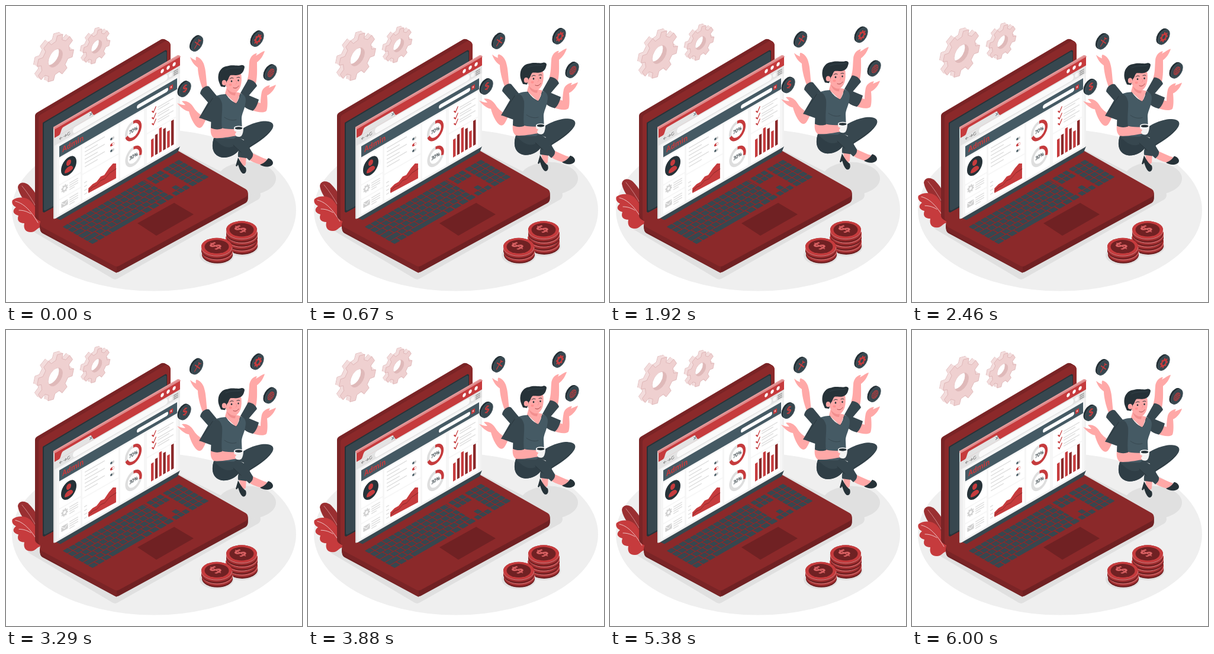
An HTML page with a canvas that plays this animation: 500 px wide and 500 px high, repeating every 6040 ms.

```html
<!DOCTYPE html>
<html lang="en">
<head>
<meta charset="utf-8">
<title>Admin dashboard</title>
<style>
html, body { margin: 0; width: 100%; height: 100%; overflow: hidden; background: #fff; }
canvas { display: block; width: 500px; height: 500px; }
</style>
</head>
<body>
<canvas id="stage"></canvas>
<script>
const cv = document.getElementById('stage');
const c = cv.getContext('2d');
const dpr = window.devicePixelRatio || 1;
cv.width = cv.height = 500 * dpr;

const LOOP = 6040, RISE = 9.4;
const RED = '#c63b3d', WINE = '#8b292a', DEEP = '#702123';
const SLATE = '#37474f', STEEL = '#455a64', INK = '#263238';
const SKIN = '#ffa8a7', BLUSH = '#f28f8f', SHADE = '#e0e0e0';
const FONT = '"Open Sans", "Noto Sans", sans-serif';
const TAU = Math.PI * 2;

function shape(d, fill) { c.fillStyle = fill; c.fill(new Path2D(d)); }
function line(d, color, w = 1) {
  c.strokeStyle = color; c.lineWidth = w; c.lineCap = c.lineJoin = 'round';
  c.stroke(new Path2D(d));
}
function oval(x, y, rx, ry, fill) {
  c.beginPath(); c.ellipse(x, y, rx, ry, 0, 0, TAU);
  c.fillStyle = fill; c.fill();
}
function box(x, y, w, h, fill, r = 0) {
  c.beginPath(); c.roundRect(x, y, w, h, r);
  c.fillStyle = fill; c.fill();
}
function poly(pts, fill, r = 0, dx = 0, dy = 0) {
  const n = pts.length, last = pts[n - 1];
  c.beginPath();
  c.moveTo((last[0] + pts[0][0]) / 2 + dx, (last[1] + pts[0][1]) / 2 + dy);
  pts.forEach((p, i) => {
    const q = pts[(i + 1) % n];
    c.arcTo(p[0] + dx, p[1] + dy, (p[0] + q[0]) / 2 + dx, (p[1] + q[1]) / 2 + dy, r);
  });
  c.closePath(); c.fillStyle = fill; c.fill();
}
function at(m, draw) { c.save(); c.transform(...m); draw(); c.restore(); }
const wall = (x, y) => [.866, -.5, 0, 1, x, y];
const floor = (x, y) => [.866, -.5, .866, .5, x, y];
function label(s, x, y, size, fill, weight = 700, align = 'center') {
  c.font = `${weight} ${size}px ${FONT}`;
  c.textAlign = align; c.textBaseline = 'middle';
  c.fillStyle = fill; c.fillText(s, x, y);
}

function cog(R, hole, teeth = 8) {
  const p = new Path2D(), step = TAU / teeth;
  for (let i = 0; i < teeth; i++) {
    [[-.29, .77], [-.2, 1], [.2, 1], [.29, .77]].forEach(([a, r]) => {
      const t = (i + a + .33) * step;
      p.lineTo(R * r * Math.cos(t), R * r * Math.sin(t));
    });
  }
  p.closePath();
  p.moveTo(hole, 0);
  p.arc(0, 0, hole, 0, TAU);
  return p;
}
function gear(x, y, R, depth) {
  const hole = R * .38, p = cog(R, hole);
  for (let k = depth; k >= 0; k -= .5) at(wall(x - k, y - k * .577), () => {
    c.fillStyle = k ? '#f3dcdc' : '#efd0d0';
    c.fill(p, 'evenodd');
    if (k === 0 || k === depth) {
      c.strokeStyle = '#d5a5a6'; c.lineWidth = .6; c.stroke(p);
    }
  });
  // Inner wall of the hole
  at(wall(x, y), () => {
    c.beginPath(); c.arc(0, 0, hole, 0, TAU); c.clip();
    c.fillStyle = '#dfb9b9'; c.fill();
    oval(-depth / .866, -depth * 1.155, hole, hole, '#fff');
  });
}

function ground() {
  oval(250, 345, 240, 136.5, '#efefef');
  poly([[26, 369], [184, 463], [440, 319], [285, 240]], SHADE, 9);
  oval(407, 291.5, 49, 28, SHADE);
}

function plant() {
  shape('M55 356C42 344 22 322 20 306C21 297 32 296 39 303C48 312 54 322 56 334Z', '#9a2f31');
  line('M27 304C36 315 45 328 52 342', '#dc9b9c', .8);
  shape('M11 328C19 322 33 322 41 329C49 337 54 348 58 360L58 374C52 375 50 382 42 382C33 382 29 376 31 367C22 367 18 362 21 354C13 352 9 346 17 340C11 337 9 332 11 328Z', RED);
  line('M16 330C30 333 42 346 54 366M22 345C31 345 37 348 42 351', '#f1d4d4', .9);
}

function keyboard() {
  at(floor(96, 373), () => {
    const key = (x, y, w) => box(x, y, w, 8.5, SLATE, .8);
    for (let r = 0; r < 6; r++) {
      const y = r * 9.9;
      if (r < 5) {
        const lead = [0, 0, 5, 8, 13][r];
        if (lead) key(0, y, 9.4 + lead);
        for (let x = lead ? lead + 11.2 : 0; x < 157; x += 11.2)
          key(x, y, Math.min(9.7, 158 - x));
      } else {
        [0, 13, 26].forEach(x => key(x, y, 11));
        key(39, y, 64);
        [105, 119, 133, 147].forEach(x => key(x, y, 11.5));
      }
      for (let k = 0; k < 3; k++) {
        if (r < 2 || r === 5 || (r === 4 && k === 1)) key(163 + k * 9.6, y, 8);
        key(195 + k * 11, y, 9.5);
      }
    }
  });
}

function laptop() {
  const lid = [[49, 182], [272, 50.5], [272, 240], [49, 366]];
  for (let k = 0; k < 6; k += .5) poly(lid, '#7a2426', 7, k, k * .577);
  poly(lid, WINE, 7, 6, 3.5);
  poly([[62, 197], [272, 73], [272, 236], [62, 350]], INK, 2);
  poly([[64, 198], [271, 75.500], [271, 232], [64, 347]], SLATE, 2);

  const base = [[49, 367], [187, 441], [417, 316], [279, 238]];
  for (let k = 10; k > 0; k--) poly(base, DEEP, 8, 0, k);
  shape('M58 368L187 437V451L62 381C57 378 56 373 58 368Z', '#7a2426');
  poly(base, WINE, 8);
  shape('M84 358L294 237L290 247L92 361.500Z', SLATE);
  keyboard();
  shape('M222 367L284 332.500L317 352L254 388Z', DEEP);
}

function ring(x, y, part) {
  const R = 13.8;
  c.lineWidth = 5; c.lineCap = 'butt';
  c.strokeStyle = '#dedede';
  c.beginPath(); c.arc(x, y, R, 0, TAU); c.stroke();
  c.strokeStyle = RED;
  c.beginPath(); c.arc(x, y, R, -TAU / 4, -TAU / 4 + TAU * part); c.stroke();
  label(Math.round(part * 100) + '%', x, y + .5, 8.5, INK, 600);
}

function page() {
  const W = 212 / .866, X = v => v / .866;
  const bar = (x, y, w, h = 1.5, col = '#dcdcdc') => box(X(x), y, X(w), h, col, h / 2);
  const panel = (x, y, w, h) => box(X(x), y, X(w), h, '#fff', 1);
  box(0, 0, W, 154, '#f0f0f0', [2, 4, 2, 2]);
  box(0, 0, W, 17, RED, [2, 4, 0, 0]);
  box(0, 0, W, 2.5, '#e08a8b', [2, 3, 0, 0]);
  box(0, 17, W, 13, '#e3e3e3');
  shape('M8 17C13 17 12 7 17 7H69C74 7 73 17 79 17Z', '#e3e3e3');
  line('M69 10l4 4m0 -4l-4 4', STEEL, .8);
  [182, 192, 202].forEach(x => oval(X(x), 9, 3.2, 3.2, '#fff'));
  line('M10 23.500h5m-5 0l2 -2m-2 2l2 2M18 23.500h5m0 0l-2 -2m2 2l-2 2', '#777', .8);
  c.beginPath(); c.arc(X(24), 23.5, 2.5, .3, 5.4); c.stroke();
  box(X(31), 18.5, X(160), 10, '#fafafa', 5);
  oval(X(196), 23.5, 3.4, 3.4, '#f7f7f7');
  [20.5, 23.5, 26.5].forEach(y => bar(201, y, 8, 1.4, '#8d8d8d'));

  box(X(4), 31, X(205), 120, '#f6f6f6');
  box(X(8), 35.5, X(199), 18.5, STEEL);
  label('Admin', X(13), 45.5, 12.8, RED, 700, 'left');
  box(X(139), 42, X(53), 6.5, '#fff', 3);
  box(X(194), 41.5, X(6), 7, RED, 1);
  oval(X(197), 44.6, 1.4, 1.4, '#f3c8c8');

  // Profile column
  panel(8, 57, 36, 43);
  oval(X(24), 78, 15, 15, INK);
  oval(X(24), 72.5, 4.6, 4.8, RED);
  shape('M19.500 86C19.500 77 36 77 36 86C32 89 23 89 19.500 86Z', RED);
  [102, 127].forEach(y => {
    panel(8, y, 36, 23);
    for (let i = 0; i < 4; i++) bar(25, y + 5 + i * 3.7, i === 3 ? 9 : 15);
  });
  at([1, 0, 0, 1, X(17), 112], () => {
    c.fillStyle = '#d2d2d2'; c.fill(cog(6.8, 2.5), 'evenodd');
  });
  box(X(17) - 6.5, 133, 13, 9, '#d0d0d0', 1);
  line('M13.300 134l6.300 5l6.300 -5', '#fff', .9);

  // List with switches
  panel(47, 57, 61, 48);
  for (let i = 0; i < 6; i++) bar(51, 63 + i * 6.3, i % 2 ? 22 : 34);
  [74, 84, 94].forEach((y, i) => {
    box(X(94), y - 2.2, 8, 4.6, i === 1 ? RED : '#cfcfcf', 2.3);
    oval(X(94) + (i === 1 ? 5.8 : 2.2), y, 1.9, 1.9, i === 1 ? '#fff' : STEEL);
  });
  panel(47, 107, 61, 43);
  for (let i = 0; i < 4; i++) bar(50, 121 + i * 6.5, 5);
  shape('M66 143V135L74 132L82 132L90 127L97 128L106 121L114 117L120 120V145Z', RED);
  line('M66 140L74 137L82 138L90 134L98 135L108 130L120 129', WINE, 1);

  panel(111, 57, 40, 93);
  ring(X(133), 81, .7);
  ring(X(133.5), 125, .3);

  // Tasks and bars
  panel(156, 57, 49, 42);
  [67, 78, 88].forEach(y => {
    line(`M${X(165)} ${y}l2.500 3l4.500 -7`, RED, 1.8);
    bar(174, y - 2, 27);
    bar(174, y + 2, 20);
  });
  panel(156, 101, 49, 49);
  [30, 34, 41, 36, 28, 42].forEach((h, i) =>
    box(X(163 + i * 6.8), 144 - h, X(4.4), h, i % 2 ? WINE : RED));
}

function browser() {
  shape('M80 205L290.500 83.500Q294 83 295 86L82 208V360L80 359Z', '#d9d9d9');
  shape('M80 206V204.500L290 83Q294 82.500 295 86L82 209Z', '#e59b9c');
  at(wall(82, 206), page);
}

function pile(x, y, n) {
  const H = 6.8;
  oval(x, y + n * H + 1, 29, 16.5, SHADE);
  for (let i = n - 1; i >= 0; i--) {
    const dx = i ? (i % 2 ? 1 : -.5) : 0, top = y + i * H;
    for (let k = H; k > 0; k -= .85) oval(x + dx, top + k, 26, 14.7, k > 5 ? DEEP : '#a63032');
    oval(x + dx, top, 26, 14.7, RED);
    c.strokeStyle = '#e9a5a5'; c.lineWidth = .7;
    c.beginPath(); c.ellipse(x + dx, top + 1, 26, 14.7, 0, 0, Math.PI); c.stroke();
  }
  oval(x, y, 20.5, 11.5, DEEP);
  at(floor(x, y), () => label('$', 0, 0, 25, '#d86062'));
}

function token(x, y, icon) {
  for (let k = 3; k > 0; k -= .5) at(wall(x - k, y - k * .577), () => oval(0, 0, 11.6, 11.6, INK));
  at(wall(x, y), () => {
    oval(0, 0, 11.6, 11.6, SLATE);
    c.strokeStyle = '#53646d'; c.lineWidth = .6;
    c.beginPath(); c.arc(0, 0, 11.4, 0, TAU); c.stroke();
    icon();
  });
}
function tools() {
  line('M-5 5L4 -4M-4 -5L5 5', RED, 1.6);
  line('M3 -6l1 3l3 1', RED, 1.4);
}
function globe() {
  line('M-6 0H6M0 -6V6M-5 -3H5M-5 3H5', RED, .9);
  c.beginPath(); c.arc(0, 0, 6, 0, TAU); c.ellipse(0, 0, 3, 6, 0, 0, TAU); c.stroke();
}

function backArms() {
  shape('M333 142C327 128 324 112 324 104C318 100 313 93 311 86C314 89 318 91 321 92C320 88 321 85 323 86C329 88 334 95 335 101C338 110 338 125 340 138Z', SKIN);
  shape('M328 148C328 141 337 133 343 136L357 153L350 173Z', SLATE);
  shape('M340 187C335 197 332 206 327 206C320 206 312 190 309 178C302 177 295 171 289 164C295 166 299 168 303 167L297 161C305 159 312 164 316 170C320 177 326 182 332 186Z', SKIN);
  shape('M326 189L347 153L361 160L347 196C340 194 332 190 326 189Z', SLATE);
  line('M349 156L333 180', INK, .8);
  shape('M407 127C411 115 410 105 411 96C411 88 417 80 424 80L422 84C428 81 432 77 437 76C435 83 430 91 424 95C424 108 425 122 421 135Z', SKIN);
  shape('M396 147L409 124C416 124 422 129 424 135L407 155Z', SLATE);
  shape('M420 161L430 164C430 157 431 150 432 145C434 138 441 134 446 134L444 138L456 133C454 140 448 148 441 151C442 162 442 172 440 177C436 181 425 180 416 176Z', SKIN);
  shape('M394 150L408 150L427 158C425 166 422 173 417 177C408 175 402 170 396 165Z', SLATE);
}

function legs() {
  shape('M393 251L406 253L405 268L400 273L396 264Z', SKIN);
  shape('M392 256C396 263 400 270 405 273C407 279 405 284 400 283C395 279 394 273 392 268L390 271L388 270Z', INK);
  shape('M383 219C405 201 425 194 439 194.500C452 195 454 202 449 209C439 223 424 231 412 239C408 248 407 254 406 257L392 255C391 245 395 235 402 226Z', SLATE);
  line('M447 211C434 224 420 232 411 238', INK, .8);
  shape('M411 260L417 249C426 253 434 257 441 259L437 269C428 268 419 265 411 260Z', SKIN);
  shape('M429 268C437 265 439 262 443 257C449 258 454 265 449 269C443 273 435 272 429 268Z', INK);
  shape('M352 220C346 236 348 254 367 256C380 256 388 250 393 244L411 261C415 258 418 254 417 249C411 240 407 229 397 224L384 216Z', SLATE);
  shape('M351 224C346 238 349 254 367 256C380 256 388 250 393 244L385 236C379 241 367 239 358 230Z', '#2f3e46');
  line('M384 235L397 247', INK, .8);
}

function body() {
  shape('M370 148L373 137L388 145L396 147L389 166Z', SKIN);
  shape('M351 154C358 150 365 149 371 149C376 157 382 162 389 165C393 160 395 153 396 148C403 149 407 155 404 166C403 175 398 182 398 190L399 214L385 224L354 224Z', STEEL);
  line('M371 149C376 157 382 162 389 165C393 160 395 153 396 148', SLATE, 1);
  line('M369 188C376 193 383 194 389 192', SLATE, .9);
  shape('M346 205L364 206C372 208 380 208 386 208L392 211C397 215 395 219 390 219C382 220 366 224 351 223C346 219 345 212 346 205Z', SKIN);
  shape('M353 153C346 158 347 169 347 178L346 206C352 209 360 209 365 207C363 192 366 177 365 165C363 156 358 151 353 153Z', SLATE);
  shape('M385 206C385.500 213 387 218 389 220C392 221.500 396 221.500 398 219C400 216 401 211 401 206Z', '#f3f3f3');
  oval(393, 206, 8, 3.4, '#fff');
  oval(393, 206.3, 6.4, 2.3, INK);
  shape('M380 212C384 211 388 211 389 213C388 216 384 218 380 218Z', SKIN);
}

function head() {
  shape('M373 139C379 146 384 147 388 146L387 151C380 151 375 147 373 139Z', BLUSH);
  shape('M369 117C371 107 396 108 397.500 117C399 130 396 142 388 146C380 147 372 139 370 132Z', SKIN);
  shape('M363 136C361 131 358 126 358.500 119C359 109 366 102 374 101.500C382 98.500 392 102 397 100C400 99 403 101 403 103C402 109 400 114 394 116C387 118 383 116 379 117C376 120 376 125 373 127L370 137Z', INK);
  line('M371 108C382 103 391 106 398 104', SLATE, .7);
  oval(368.5, 129.5, 3.7, 4.5, SKIN);
  line('M367 128C369 128 370 130 369 132', BLUSH, .8);
  oval(381, 127, 1.3, 1.6, INK);
  oval(392.5, 125.7, 1.2, 1.6, INK);
  line('M378 123C380 121 382 121 384 122M390 121C392 120 394 120 395 121', INK, 1);
  line('M388 126C390 129 391 131 388 132', BLUSH, .9);
  line('M384 138C388 140 391 138 393 135', '#a03b3d', .9);
  oval(379, 133, 2.6, 2, '#ff9291');
}

function woman() {
  token(323, 64, tools);
  token(425.5, 56, () => { c.fillStyle = RED; c.fill(cog(7.8, 3), 'evenodd'); });
  token(447.5, 113, globe);
  token(302.5, 141, () => label('$', 0, 0, 17, RED));
  backArms();
  legs();
  body();
  head();
}

function lifted(dy, draw) { at([1, 0, 0, 1, 0, dy], draw); }
// Linear rise and fall, 0 to 1 to 0
const swing = (t, period) => 1 - Math.abs((t % period) / period * 2 - 1);

function frame(now) {
  const t = (now - start) % LOOP;
  const slow = -RISE * swing(t, LOOP), quick = -RISE * swing(t, LOOP / 2);
  c.setTransform(dpr, 0, 0, dpr, 0, 0);
  c.fillStyle = '#fff';
  c.fillRect(0, 0, 500, 500);
  ground();
  lifted(slow, () => {
    gear(83.5, 88, 36, 6);
    gear(153, 68.5, 26.5, 5);
    plant();
  });
  laptop();
  browser();
  pile(398, 378, 4);
  pile(356, 406.5, 2);
  lifted(quick, woman);
  requestAnimationFrame(t => frame(Math.max(t, start)));
}
const start = performance.now();
frame(start);
</script>
</body>
</html>
```
